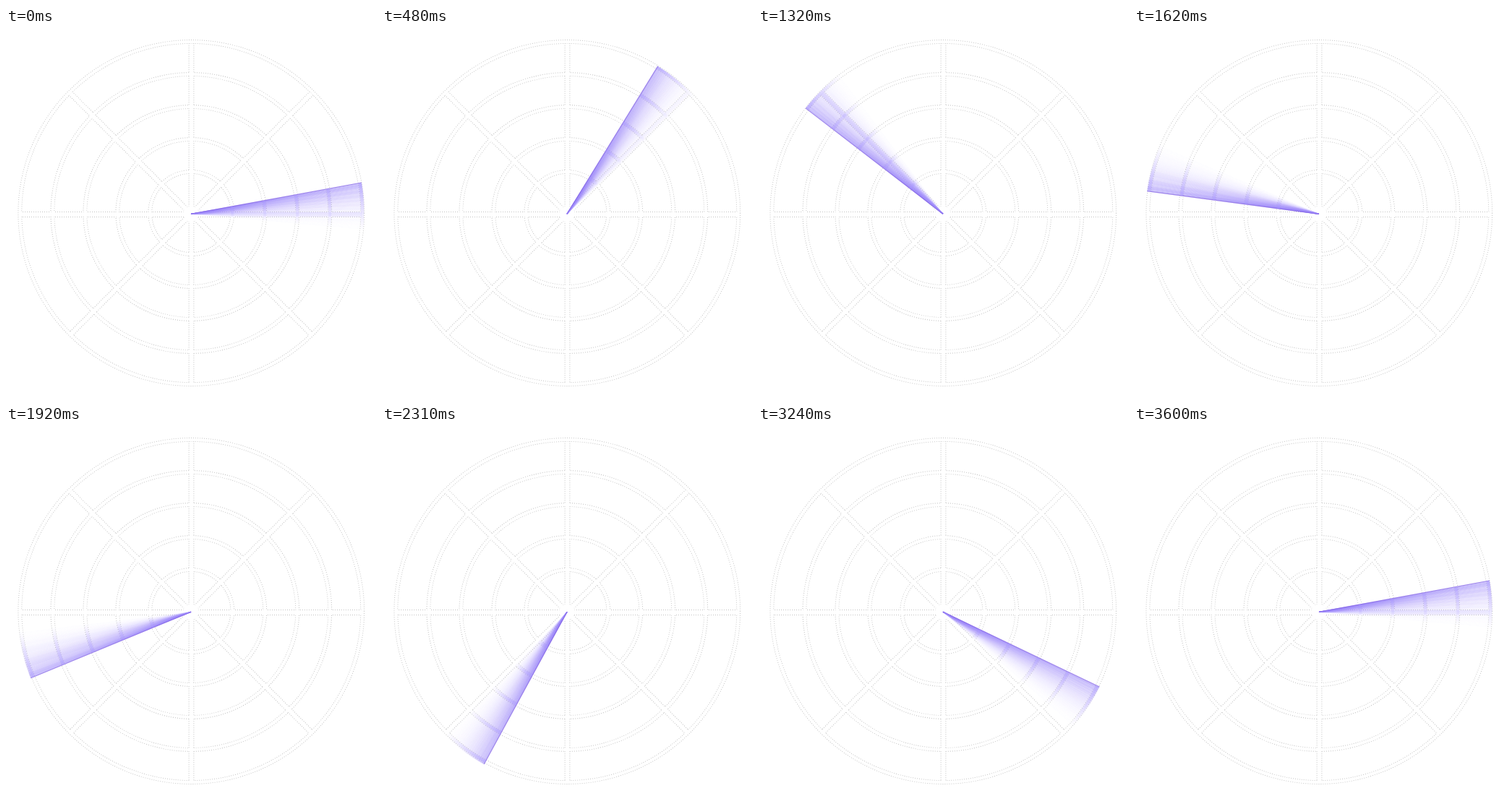
These frames come from a looping animation (512x512 px, 3.63 s). An HTML page with a canvas:

```html
<!DOCTYPE html>
<html lang="en">
<head>
<meta charset="utf-8">
<title>Radar sweep</title>
<style>
html, body { margin: 0; width: 100%; height: 100%; overflow: hidden; background: #fff; }
canvas { display: block; width: 512px; height: 512px; }
</style>
</head>
<body>
<canvas id="radar" width="512" height="512"></canvas>
<script>
const ctx = document.getElementById('radar').getContext('2d');
const RAD = Math.PI / 180;
const FRAME_MS = 30, FRAMES = 121;
const START = 10.4, STEP = 3, TAIL = 20, RAYS = 80, REACH = 240;
const RINGS = [57, 102, 147, 192, 237];
const hub = { x: 256, y: 257.3 };

function strokeRings(width) {
  ctx.lineWidth = width;
  for (const r of RINGS) {
    ctx.beginPath();
    ctx.arc(256.3, 256, r, 0, 2 * Math.PI);
    ctx.stroke();
  }
}

function strokeSpokes(width) {
  ctx.lineWidth = width;
  for (let k = 0; k < 4; k++) {
    const dx = 236 * Math.cos(k * 45 * RAD), dy = 236 * Math.sin(k * 45 * RAD);
    const x = k === 2 ? 256.5 : hub.x, y = k === 0 ? 258 : hub.y;
    ctx.beginPath();
    ctx.moveTo(x - dx, y - dy);
    ctx.lineTo(x + dx, y + dy);
    ctx.stroke();
  }
}

function strokeBands(style) {
  ctx.strokeStyle = style;
  strokeRings(4);
  strokeSpokes(5.8);
}

function drawGrid() {
  ctx.strokeStyle = '#c2c2c2';
  ctx.setLineDash([1, 2]);
  strokeRings(5.8);
  strokeSpokes(7.8);
  ctx.setLineDash([]);
  strokeBands('#fff');
  ctx.fillStyle = '#fff';
  ctx.beginPath();
  ctx.arc(hub.x, hub.y, 11, 0, 2 * Math.PI);
  ctx.fill();
}

function drawRay(angle, style, width) {
  ctx.strokeStyle = style;
  ctx.lineWidth = width;
  ctx.beginPath();
  ctx.moveTo(hub.x, hub.y);
  ctx.lineTo(hub.x + REACH * Math.cos(angle), hub.y + REACH * Math.sin(angle));
  ctx.stroke();
}

function bandTint(lead) {
  const tint = ctx.createConicGradient(lead, hub.x, hub.y);
  tint.addColorStop(0, 'rgba(165,148,255,0.4)');
  tint.addColorStop(TAIL * 0.4 / 360, 'rgba(165,148,255,0.22)');
  tint.addColorStop(TAIL * 0.8 / 360, 'rgba(165,148,255,0)');
  return tint;
}

function drawSweep(degrees) {
  const lead = -degrees * RAD;
  // Rays overlap towards the hub, so the tail is denser there.
  for (let i = RAYS - 1; i >= 0; i--) {
    const alpha = 0.55 * (1 - i / RAYS) ** 3;
    drawRay(lead + i / RAYS * TAIL * RAD, `rgba(158,138,248,${alpha})`, 1.2);
  }
  drawRay(lead, 'rgba(110,70,215,0.45)', 1.2);

  ctx.save();
  ctx.beginPath();
  ctx.moveTo(hub.x, hub.y);
  ctx.arc(hub.x, hub.y, REACH, lead, lead + TAIL * RAD);
  ctx.closePath();
  ctx.clip();
  strokeBands(bandTint(lead));
  ctx.restore();
}

function draw(now) {
  const frame = Math.floor(now / FRAME_MS) % FRAMES;
  ctx.fillStyle = '#fff';
  ctx.fillRect(0, 0, 512, 512);
  drawGrid();
  drawSweep(START + STEP * frame);
}

let origin;
function tick(now) {
  origin ??= now;
  draw(now - origin);
  requestAnimationFrame(tick);
}
draw(0);
requestAnimationFrame(tick);
</script>
</body>
</html>
```
